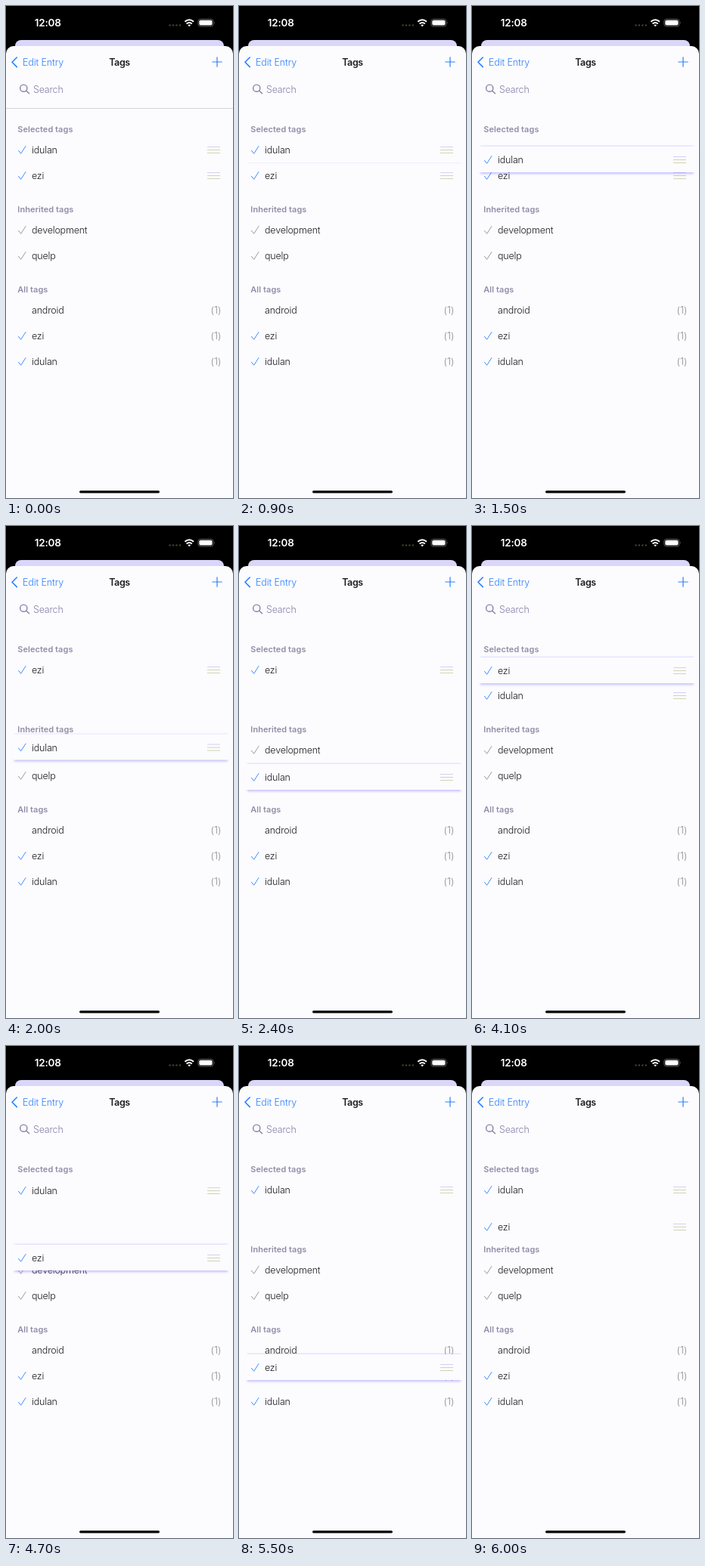
Recreate the animation shown at these times as an HTML page. Size 300x651 px, loop 6100 ms.

```html
<!DOCTYPE html>
<html lang="en">
<head>
<meta charset="utf-8">
<title>Tags</title>
<style>
  html, body { margin: 0; width: 100%; height: 100%; overflow: hidden; background: #000; }
  .stage { position: relative; width: 300px; height: 651px; overflow: hidden; }
  svg { display: block; }
  text { font: 350 12.5px Inter, Roboto, sans-serif; letter-spacing: -.2px; fill: #1c1c20; }
  .blue { fill: #2a80fb; letter-spacing: -.12px; }
  .title { font-weight: 600; letter-spacing: -.4px; }
  .head { font-size: 11px; font-weight: 600; letter-spacing: .05px; fill: #918ea6; }
  .hint { fill: #8580a6; }
  .count { fill: #88888c; letter-spacing: .1px; }
  .clock { font-weight: 600; font-size: 13.5px; letter-spacing: -.25px; fill: #fff; }
  .line { fill: none; stroke: #2a80fb; stroke-linecap: round; stroke-linejoin: round; }
  .gray { stroke: #8e8e94; }

  .row, .divider { animation: 6100ms step-end infinite; }
  .row {
    --half: 0 2px 2px -2px rgb(120 110 245 / .3);
    --full: 0 4px 3px -2px rgb(120 110 245 / .42), 0 -3px 2px -2px rgb(120 110 245 / .25);
    position: absolute; left: 9px; top: 173px; width: 286px; height: 34px;
    background: #fcfcff; z-index: 1;
  }
  .first { animation-name: move-first, lift-first; }
  .second { animation-name: move-second, lift-second; }
  .divider { animation-name: hide; }

  @keyframes hide { 0% { opacity: 1 } 14.754%, 100% { opacity: 0 } }

  /* positions advance every 100 ms */
  @keyframes move-first {
    0% { transform: none }
    19.672% { transform: translateY(1px) }
    21.311% { transform: translateY(3px) }
    22.950% { transform: translateY(7px) }
    24.590% { transform: translateY(13px); animation-timing-function: steps(5) }
    32.786% { transform: translateY(102.5px) }
    34.426% { transform: translateY(119px) }
    36.065% { transform: translateY(131px) }
    37.704% { transform: translateY(138px) }
    39.344% { transform: translateY(142px) }
    42.622% { transform: translateY(128px) }
    44.262% { transform: translateY(97px) }
    45.901% { transform: translateY(66px) }
    47.540% { transform: translateY(48px) }
    49.180% { transform: translateY(34px) }
    72.131% { transform: translateY(24px) }
    73.770% { transform: translateY(11px) }
    75.409% { transform: translateY(4px) }
    77.049% { transform: translateY(1px) }
    78.688%, 100% { transform: none }
  }
  @keyframes move-second {
    0% { transform: translateY(34px) }
    26.229% { transform: translateY(24px) }
    27.868% { transform: translateY(11px) }
    29.508% { transform: translateY(4px) }
    31.147% { transform: translateY(1px) }
    32.786% { transform: none }
    67.213% { transform: translateY(1px) }
    68.852% { transform: translateY(3px) }
    70.491% { transform: translateY(10px) }
    72.131% { transform: translateY(23px); animation-timing-function: steps(3) }
    77.049% { transform: translateY(90px); animation-timing-function: steps(6) }
    86.885% { transform: translateY(218px) }
    88.524% { transform: translateY(230px) }
    90.163% { transform: translateY(235px) }
    93.442% { transform: translateY(205px) }
    95.081% { transform: translateY(130px) }
    96.721% { transform: translateY(77px) }
    98.360% { transform: translateY(49px) }
    100% { transform: translateY(34px) }
  }
  @keyframes lift-first {
    0% { z-index: 1; box-shadow: none }
    14.754% { z-index: 2; box-shadow: var(--half) }
    18.032% { z-index: 2; box-shadow: var(--full) }
    44.262% { z-index: 2; box-shadow: var(--half) }
    45.901% { z-index: 2; box-shadow: none }
    49.180%, 100% { z-index: 1; box-shadow: none }
  }
  @keyframes lift-second {
    0% { z-index: 1; box-shadow: none }
    65.573% { z-index: 2; box-shadow: var(--half) }
    67.213% { z-index: 2; box-shadow: var(--full) }
    93.442% { z-index: 2; box-shadow: var(--half) }
    95.081% { z-index: 2; box-shadow: none }
    100% { z-index: 1; box-shadow: none }
  }
</style>
</head>
<body>
<div class="stage">
  <svg width="300" height="651">
    <defs>
      <path id="check" d="M16.5 191.3 19.7 195.3 26 185.5" stroke-width=".9"/>
      <g id="handle">
        <path d="M266 186.5h17" stroke="#d3cff2"/>
        <path d="M266 190.5h17M266 194.5h17" stroke="#d2d2b4"/>
      </g>
    </defs>

    <rect width="300" height="651"/>
    <rect x="12" y="45" width="276" height="30" rx="8" fill="#dad6fa"/>
    <path d="M0 651V63a10 10 0 0 1 10-10h280a10 10 0 0 1 10 10v588z" fill="#fcfcff"/>

    <!-- status bar -->
    <text class="clock" x="37.8" y="27">12:08</text>
    <path d="M215.5 25.5h16" stroke="#4b4b2c" stroke-width="2" stroke-dasharray="2.2 2.2"/>
    <g fill="none" stroke="#fff" stroke-width="2">
      <path d="M236.4 20.8q5.8-5.2 11.6 0M238.6 23.5q3.6-3 7.2 0"/>
      <path d="M240.3 25.2q1.9-1.5 3.8 0l-1.9 2z" fill="#fff" stroke="none"/>
    </g>
    <rect x="253.9" y="17.4" width="20" height="9.6" rx="3" fill="none" stroke="#5c5c5c"/>
    <rect x="255.3" y="18.8" width="17.2" height="6.8" rx="1.8" fill="#fff"/>
    <path d="M275.4 20.6q1.6 1.6 0 3.2z" fill="#5c5c5c"/>

    <!-- navigation -->
    <path class="line" d="M14.3 68 8 74.3l6.3 6.3" stroke-width="1.6"/>
    <text class="blue" x="22" y="79">Edit Entry</text>
    <text class="title" x="150" y="79" text-anchor="middle">Tags</text>
    <path class="line" d="M272.8 74h12.4M279 67.8v12.4" stroke-width="1.2"/>

    <g fill="none" stroke="#8580a6" stroke-width="1.4" stroke-linecap="round">
      <circle cx="23.3" cy="108.7" r="4.6"/>
      <path d="m26.8 112.2 3.8 3.6"/>
    </g>
    <text class="hint" x="36" y="115">Search</text>
    <path class="divider" d="M0 135.5h300" stroke="#d4d4d8"/>

    <!-- lists -->
    <text class="head" x="15.3" y="167">Selected tags</text>
    <text class="head" x="15.3" y="273">Inherited tags</text>
    <text class="head" x="15.3" y="379">All tags</text>

    <use href="#check" class="line gray" y="106"/>
    <text x="34" y="301">development</text>
    <use href="#check" class="line gray" y="140"/>
    <text x="34" y="335">quelp</text>

    <text x="34" y="407">android</text>
    <text class="count" x="284.5" y="407" text-anchor="end">(1)</text>
    <use href="#check" class="line" y="246"/>
    <text x="34" y="441">ezi</text>
    <text class="count" x="284.5" y="441" text-anchor="end">(1)</text>
    <use href="#check" class="line" y="280"/>
    <text x="34" y="475">idulan</text>
    <text class="count" x="284.5" y="475" text-anchor="end">(1)</text>

    <rect x="97" y="641.2" width="106" height="3.2" rx="1.6"/>
  </svg>

  <div class="row first">
    <svg width="286" height="34" viewBox="9 173 286 34">
      <use href="#check" class="line"/>
      <text x="34" y="195">idulan</text>
      <use href="#handle"/>
    </svg>
  </div>
  <div class="row second">
    <svg width="286" height="34" viewBox="9 173 286 34">
      <use href="#check" class="line"/>
      <text x="34" y="195">ezi</text>
      <use href="#handle"/>
    </svg>
  </div>
</div>
</body>
</html>
```
